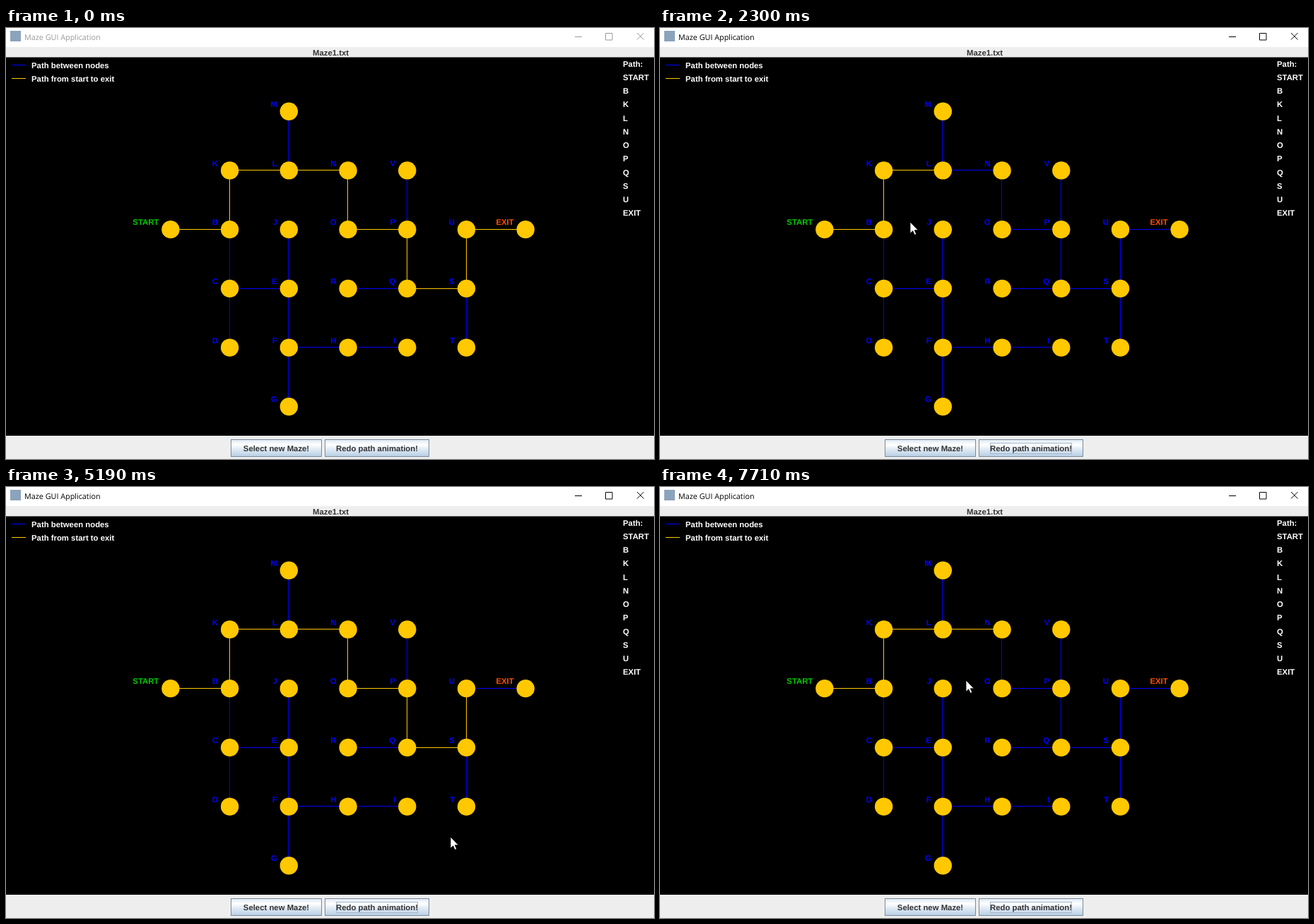
These frames come from a looping animation (917 px wide and 611 px high, 8000 ms). An HTML page:

```html
<!DOCTYPE html>
<html lang="en">
<head>
<meta charset="utf-8">
<title>Maze GUI Application</title>
<style>
  html, body { margin: 0; width: 100%; height: 100%; overflow: hidden; background: #fff; }
  svg { display: block; }
  text { font: bold 11.35px "Liberation Sans", Arial, sans-serif; text-rendering: geometricPrecision; white-space: pre; }
  .caption { font: 10.8px "Open Sans", "Noto Sans", sans-serif; }
</style>
</head>
<body>
<svg id="stage" width="917" height="611" viewBox="0 0 917 611">
  <defs>
    <linearGradient id="metal" x1="0" y1="0" x2="0" y2="1">
      <stop offset="0" stop-color="#dde8f3"/>
      <stop offset=".3" stop-color="#fff"/>
      <stop offset=".6" stop-color="#dde8f3"/>
      <stop offset="1" stop-color="#b8cfe5"/>
    </linearGradient>
  </defs>
</svg>
<script>
const LOOP = 8000;
const GOLD = '#ffc800', BLUE = '#0000ff';
const stage = document.getElementById('stage');

function add(tag, attrs, text) {
  const el = document.createElementNS('http://www.w3.org/2000/svg', tag);
  for (const k in attrs) el.setAttribute(k, attrs[k]);
  if (text) el.textContent = text;
  return stage.appendChild(el);
}
const box = (x, y, width, height, fill, stroke = 'none') => add('rect', { x, y, width, height, fill, stroke });
const line = (x1, y1, x2, y2, stroke) => add('line', { x1, y1, x2, y2, stroke });
const label = (x, y, text, fill, anchor = 'start') => add('text', { x, y, fill, 'text-anchor': anchor }, text);

// Window frame
box(0, 0, 917, 27, '#fff');
box(0, 27, 917, 584, '#eee');
box(0, 41.5, 917, 536.5, '#000');
box(6, 4, 15, 15, '#8ba3bb');
const caption = label(26, 16.5, 'Maze GUI Application', '#999');
caption.setAttribute('class', 'caption');
const controls = add('path', {
  d: 'M805 12.5H815M848.5 7.5h9.5v9.5h-9.5zM893 7L902.5 16.5M902.5 7L893 16.5', fill: 'none'
});
label(459.5, 39, 'Maze1.txt', '#333', 'middle');

// Maze map; < is the start, > the exit
const map = ['..M....', '.KLNV..', '<BJOPU>', '.CERQS.', '.DFHIT.', '..G....'];
const branches = ['ML', 'VP', 'BCD', 'CEJ', 'EFG', 'FHI', 'RQ', 'ST'];
const route = '<BKLNOPQSU>';
const names = { '<': 'START', '>': 'EXIT' };
const colors = { '<': '#00c800', '>': '#ff5000' };
const nameOf = id => names[id] || id;

const nodes = {};
map.forEach((row, r) => [...row].forEach((id, c) => {
  if (id !== '.') nodes[id] = { x: 232.8 + 83.72 * c, y: 118.2 + 83.72 * r };
}));

const snap = v => Math.floor(v - 0.3) + 0.5;
const edge = (a, b, color) =>
  line(snap(nodes[a].x), snap(nodes[a].y), snap(nodes[b].x), snap(nodes[b].y), color);
const chain = (ids, color) => [...ids].slice(1).map((id, i) => edge(ids[i], id, color));

branches.forEach(ids => chain(ids, BLUE));
const steps = chain(route, BLUE);
for (const id in nodes) {
  const { x, y } = nodes[id];
  label(x - 16.5, y - 6.4, nameOf(id), colors[id] || BLUE, 'end');
  add('circle', { cx: x + 0.1, cy: y, r: 12.7, fill: GOLD });
}

// Legend and route list
[['Path between nodes', BLUE], ['Path from start to exit', GOLD]].forEach(([text, color], i) => {
  line(8, 52.5 + 19 * i, 28, 52.5 + 19 * i, color);
  label(36, 56.5 + 19.2 * i, text, '#fff');
});
['Path:', ...[...route].map(nameOf)].forEach((s, i) => label(873, 54.7 + 19.25 * i, s, '#fff'));

// Buttons
function button(x, w, text) {
  const frame = (d, stroke, fill) => box(x + d, 583 + d, w - 2 * d, 25 - 2 * d, fill, stroke);
  const face = frame(0.5, '#7a8a99', 'url(#metal)');
  const glow = ['#b8cfe5', '#7a8a99', '#b8cfe5'].map((c, i) => frame(i + 0.5, c, 'none'));
  const focus = box(x + 16.5, 588.5, w - 33, 15, 'none', '#a3b8cc');
  label(x + w / 2, 600, text, '#333', 'middle');
  return { x, w, face, glow, focus };
}
const pick = button(318, 129, 'Select new Maze!');
const redo = button(451, 148, 'Redo path animation!');

const cursor = add('path', {
  d: 'M0 0V16.2L3.7 12.7L6.2 18.3L8.7 17.2L6.3 11.7H11.3Z',
  fill: '#fff', stroke: '#000', 'stroke-width': 0.8
});

// Pointer moves: a smooth curve through a few points, resting in between
const moves = [
  { from: 300, to: 1010, via: [[849, 612], [620, 550], [535, 594]] },
  { from: 1670, to: 2450, via: [[535, 594], [410, 420], [328, 345], [348, 277], [371, 290]] },
  { from: 2490, to: 3260, via: [[371, 290], [400, 313], [452, 300]] },
  { from: 3360, to: 4140, via: [[452, 300], [480, 297], [518, 306], [533, 406]] },
  { from: 4170, to: 4660, via: [[533, 406], [620, 398], [733, 304]] },
  { from: 4860, to: 5280, via: [[733, 304], [660, 378], [634, 484], [626, 497]] },
  { from: 5450, to: 6160, via: [[626, 497], [540, 560], [400, 594], [482, 598]] },
  { from: 6330, to: 6880, via: [[482, 598], [440, 450], [433, 274]] }
];

function spline(pts, u) {
  const last = pts.length - 1;
  const i = Math.min(Math.floor(u * last), last - 1), f = u * last - i;
  const at = j => pts[Math.max(0, Math.min(last, j))];
  const [a, b, c, d] = [at(i - 1), at(i), at(i + 1), at(i + 2)];
  return [0, 1].map(k => b[k] + f / 2 * (c[k] - a[k]
    + f * (2 * a[k] - 5 * b[k] + 4 * c[k] - d[k] + f * (3 * (b[k] - c[k]) + d[k] - a[k]))));
}

// Each run resets the route, then lights one edge per beat
const runs = [{ press: 1210, start: 1310, beat: 442 }, { press: 6230, start: 6330, beat: 460 }];
const latest = (list, key, t) => list.filter(e => t >= e[key]).pop();
const show = (el, on) => el.setAttribute('visibility', on ? 'visible' : 'hidden');

function draw(t) {
  const active = t >= runs[0].press;
  const run = latest(runs, 'start', t);
  const lit = run ? Math.floor((t - run.start) / run.beat) + 1 : steps.length;
  steps.forEach((s, i) => s.setAttribute('stroke', i < lit ? GOLD : BLUE));

  caption.setAttribute('fill', active ? '#000' : '#999');
  controls.setAttribute('stroke', active ? '#000' : '#999');

  const move = latest(moves, 'from', t);
  const [x, y] = move ? spline(move.via, Math.min(1, (t - move.from) / (move.to - move.from))) : [0, 0];
  show(cursor, move);
  cursor.setAttribute('transform', `translate(${Math.round(x)} ${Math.round(y)})`);

  const pressed = runs.some(r => t >= r.press && t < r.start);
  for (const b of [pick, redo]) {
    const over = x >= b.x && x < b.x + b.w && y >= 583 && y < 608;
    const down = b === redo && pressed;
    b.glow.forEach(g => show(g, over && !down));
    show(b.focus, b === redo && active);
    b.face.setAttribute('fill', down ? '#b8cfe5' : 'url(#metal)');
  }
}

const began = performance.now();
function tick() {
  draw((performance.now() - began) % LOOP);
  requestAnimationFrame(tick);
}
tick();
</script>
</body>
</html>
```
